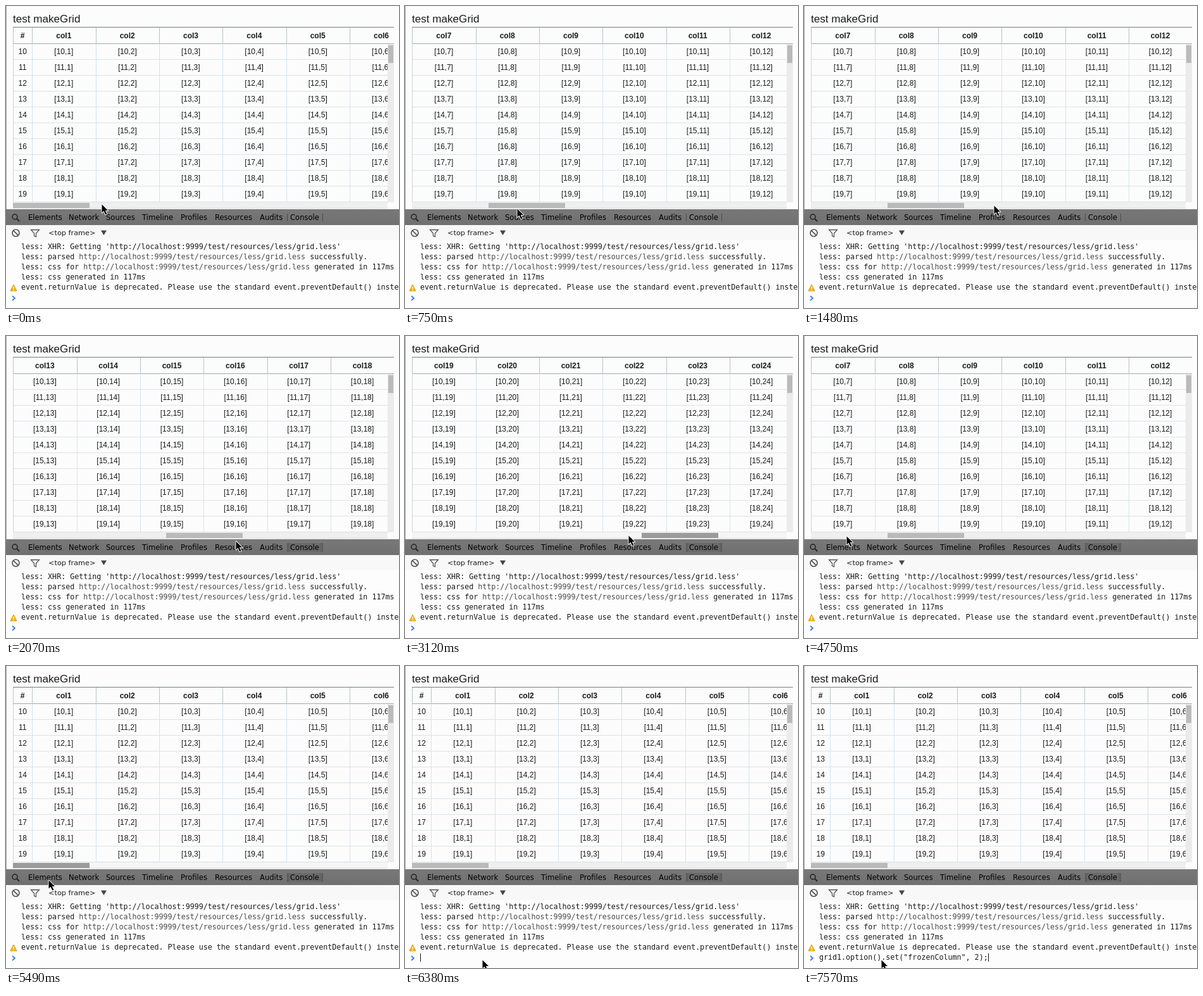
Write an HTML page with a canvas that moves like this. It is 621x477 px and loops after 8 s.

```html
<!DOCTYPE html>
<html lang="en">
<head>
<meta charset="utf-8">
<title>Grid scrolling</title>
<style>
html, body { margin: 0; width: 100%; height: 100%; overflow: hidden; background: #fcfcfc; }
canvas { display: block; width: 621px; height: 477px; }
</style>
</head>
<body>
<canvas id="stage" width="621" height="477"></canvas>
<script>
const ctx = document.getElementById('stage').getContext('2d', { alpha: false });
const LOOP = 8000;
const SANS = '"Liberation Sans", Arial, sans-serif';
const UI = '"DejaVu Sans", sans-serif';
const MONO = '11.67px "DejaVu Sans Mono", monospace';
const INK = '#1a1a1a';

const GRID = { left: 11, right: 613, bodyRight: 603, top: 33, bodyTop: 60, bottom: 309, row: 25 };
const COL_W = 602 / 6;
const THUMB_W = 121;

// Time at which each scroll page appears.
const PAGES = [[0, 0], [750, 1], [1770, 2], [3120, 3], [4160, 2], [4750, 1], [4890, 0]];

// Pointer moves: first step, last step, number of steps, end point.
const POINTER_START = [151, 313];
const MOVES = [
  [300, 450, 2, 177, 320],
  [900, 1480, 5, 300, 315],
  [1770, 2070, 3, 363, 324],
  [2220, 2670, 4, 400, 314],
  [3120, 3120, 1, 353, 315],
  [3270, 3860, 5, 75, 317],
  [4160, 4450, 3, 67, 316],
  [5490, 5490, 1, 67, 338],
  [5640, 5930, 3, 122, 464]
];

const TABS = [['Elements', 35], ['Network', 99], ['Sources', 158], ['Timeline', 215],
  ['Profiles', 276], ['Resources', 330], ['Audits', 401], ['Console', 449]];
const URL_TEXT = 'http://localhost:9999/test/resources/less/grid.less';
const LOG = [
  ["less: XHR: Getting '" + URL_TEXT + "'"],
  ['less: parsed ', URL_TEXT, ' successfully.'],
  ['less: css for ', URL_TEXT, ' generated in 117ms'],
  ['less: css generated in 117ms'],
  ['event.returnValue is deprecated. Please use the standard event.preventDefault() instead.']
];
const COMMAND = 'grid1.option().set("frozenColumn", 2);';

const within = (t, from, to) => t >= from && t < to;
const lineX = x => Math.ceil(x - 0.01);

function rect(x, y, w, h, color) {
  ctx.fillStyle = color;
  ctx.fillRect(x, y, w, h);
}

function text(str, x, y, font, color = INK, align = 'left') {
  ctx.font = font;
  ctx.fillStyle = color;
  ctx.textAlign = align;
  ctx.fillText(str, x, y);
}

function path(points, { fill, stroke, width = 1, close = true }) {
  ctx.beginPath();
  points.forEach(([x, y]) => ctx.lineTo(x, y));
  if (close) ctx.closePath();
  if (fill) { ctx.fillStyle = fill; ctx.fill(); }
  if (stroke) { ctx.strokeStyle = stroke; ctx.lineWidth = width; ctx.stroke(); }
}

function ring(x, y, r, color, width) {
  ctx.beginPath();
  ctx.arc(x, y, r, 0, Math.PI * 2);
  ctx.strokeStyle = color;
  ctx.lineWidth = width;
  ctx.stroke();
}

function clipped(x, y, w, h, draw) {
  ctx.save();
  ctx.beginPath();
  ctx.rect(x, y, w, h);
  ctx.clip();
  draw();
  ctx.restore();
}

function pageAt(t) {
  return PAGES.filter(([start]) => start <= t).pop()[1];
}

function pointerAt(t) {
  let [x, y] = POINTER_START;
  for (const [start, end, steps, toX, toY] of MOVES) {
    if (t < start) break;
    const gap = steps > 1 ? (end - start) / (steps - 1) : 1;
    const step = Math.min(steps, Math.floor((t - start) / gap + 0.01) + 1);
    const p = step / steps;
    const ease = steps > 3 ? p * p * (3 - 2 * p) : p;
    x += (toX - x) * ease;
    y += (toY - y) * ease;
  }
  return [Math.round(x), Math.round(y)];
}

function columnsFor(page) {
  const numbered = page === 0;
  const first = GRID.left + (numbered ? 30 : 0);
  const columns = numbered ? [{ x: GRID.left, w: 30, index: 0 }] : [];
  for (let i = 0; i < 6; i++) {
    columns.push({ x: first + i * COL_W, w: COL_W, index: page * 6 + i + 1 });
  }
  return columns;
}

function drawGrid(t) {
  const { left, right, bodyRight, top, bodyTop, bottom, row } = GRID;
  const columns = columnsFor(pageAt(t));
  const width = right - left;

  rect(0, 0, 1, 321, '#a8a8a8');
  text('test makeGrid', 11, 26, '17.1px ' + SANS);

  clipped(left, top, width, bodyTop - top, () => {
    rect(left, top, width, 1, '#747c7c');
    rect(left, bodyTop - 1, width, 1, '#a5abab');
    for (const { x, w, index } of columns) {
      rect(lineX(x), top + 1, 1, bodyTop - top - 1, '#b9c2c5');
      text(index ? 'col' + index : '#', x + w / 2 + 0.2, 51, 'bold 12px ' + SANS, INK, 'center');
    }
  });

  clipped(left, bodyTop, bodyRight - left, bottom - bodyTop + 1, () => {
    if (within(t, 3710, 4750)) rect(left, bottom - row + 1, width, row, '#f3f5f5');
    for (let r = 0; r < 10; r++) {
      rect(left, bodyTop + r * row + row - 1, width, 1, '#d6e3ee');
    }
    for (const { x, w, index } of columns) {
      rect(lineX(x), bodyTop, 1, bottom - bodyTop, '#d6e3ee');
      for (let r = 0; r < 10; r++) {
        const label = index ? `[${r + 10},${index}]` : String(r + 10);
        text(label, x + w / 2 + 0.2, 76 + r * row, '12px ' + SANS, INK, 'center');
      }
    }
  });
  rect(left, bodyTop, 1, bottom - bodyTop, '#ccd3d6');
}

function drawScrollbars(t) {
  const { left, bodyRight, bodyTop, bottom } = GRID;
  const hot = within(t, 3120, 3270) || within(t, 4890, 5640);
  rect(bodyRight, bodyTop, 10, bottom - bodyTop + 1, '#ebebeb');
  rect(bodyRight + 1, 62, 8, 28, '#bababa');
  rect(left, 310, bodyRight - left, 9, hot ? '#f5f5f5' : '#efefef');
  rect(left, 319, bodyRight - left, 1, '#dedede');
  rect(left + pageAt(t) * THUMB_W, 311, THUMB_W, 8, hot ? '#9b9b9b' : '#bababa');
}

function drawSelectedTab(t) {
  if (t < 1770) {
    rect(444, 328, 1, 12, '#4c4c4c');
    rect(500, 328, 1, 12, '#4c4c4c');
    return;
  }
  const shade = ctx.createLinearGradient(443, 0, 502, 0);
  shade.addColorStop(0, '#555');
  shade.addColorStop(0.1, '#696969');
  shade.addColorStop(0.9, '#696969');
  shade.addColorStop(1, '#555');
  rect(444, 327, 57, 14, shade);
}

function drawToolbars(t) {
  const shade = ctx.createLinearGradient(0, 321, 0, 346);
  shade.addColorStop(0, '#787878');
  shade.addColorStop(1, '#707070');
  rect(0, 321, 621, 25, shade);
  drawSelectedTab(t);

  ring(14, 333, 4, '#222', 1.5);
  path([[17, 336], [21, 340]], { stroke: '#222', width: 2, close: false });
  for (const [name, x] of TABS) text(name, x, 338, '11.55px ' + UI, '#000');

  rect(0, 346, 621, 24, '#f8f8f8');
  ring(15.5, 358.5, 5.5, '#555', 1.7);
  path([[11.6, 354.6], [19.4, 362.4]], { stroke: '#555', width: 1.7, close: false });
  path([[39.5, 353.5], [52.5, 353.5], [47.5, 359], [47.5, 364.5], [44.5, 363], [44.5, 359]],
    { stroke: '#555', width: 1.3 });
  text('<top frame>', 67, 362, '11.3px ' + UI);
  path([[150, 354.5], [159, 354.5], [154.5, 362]], { fill: '#444' });
}

function drawConsole(t) {
  rect(0, 370, 621, 107, '#fdfdfd');
  LOG.forEach((parts, i) => {
    let x = 24;
    for (const part of parts) {
      text(part, x, 384 + i * 16, MONO, part === URL_TEXT ? '#4a4a4a' : INK);
      x += ctx.measureText(part).width;
    }
  });

  path([[12, 440], [17, 450], [7, 450]], { fill: '#f2b617', stroke: '#dd9d08' });
  rect(11.4, 443, 1.3, 4, '#fff');
  rect(11.4, 448, 1.3, 1.3, '#fff');
  path([[10, 458], [14, 461.5], [10, 465]], { stroke: '#347ad5', width: 1.7, close: false });

  const typed = t >= 7570;
  if (typed) text(COMMAND, 24, 464, MONO);
  if (typed || within(t, 6380, 6830) || within(t, 7270, 7570)) {
    rect(typed ? 291 : 24, 454, 1, 13, '#111');
  }
}

function drawPointer(t) {
  const [x, y] = pointerAt(t);
  ctx.save();
  ctx.translate(x + 0.5, y + 0.5);
  ctx.lineJoin = 'round';
  const arrow = [[0, 0], [0, 13], [3, 10.3], [5.8, 16], [8, 15], [5.3, 9.5], [9.6, 9.5]];
  path(arrow, { fill: '#000', stroke: '#fff', width: 1.8 });
  path(arrow, { fill: '#000' });
  ctx.restore();
}

function render(t) {
  rect(0, 0, 621, 477, '#fcfcfc');
  drawGrid(t);
  drawScrollbars(t);
  drawToolbars(t);
  drawConsole(t);
  drawPointer(t);
}

const origin = performance.now();
function tick() {
  render((performance.now() - origin) % LOOP);
  requestAnimationFrame(tick);
}
tick();
</script>
</body>
</html>
```
